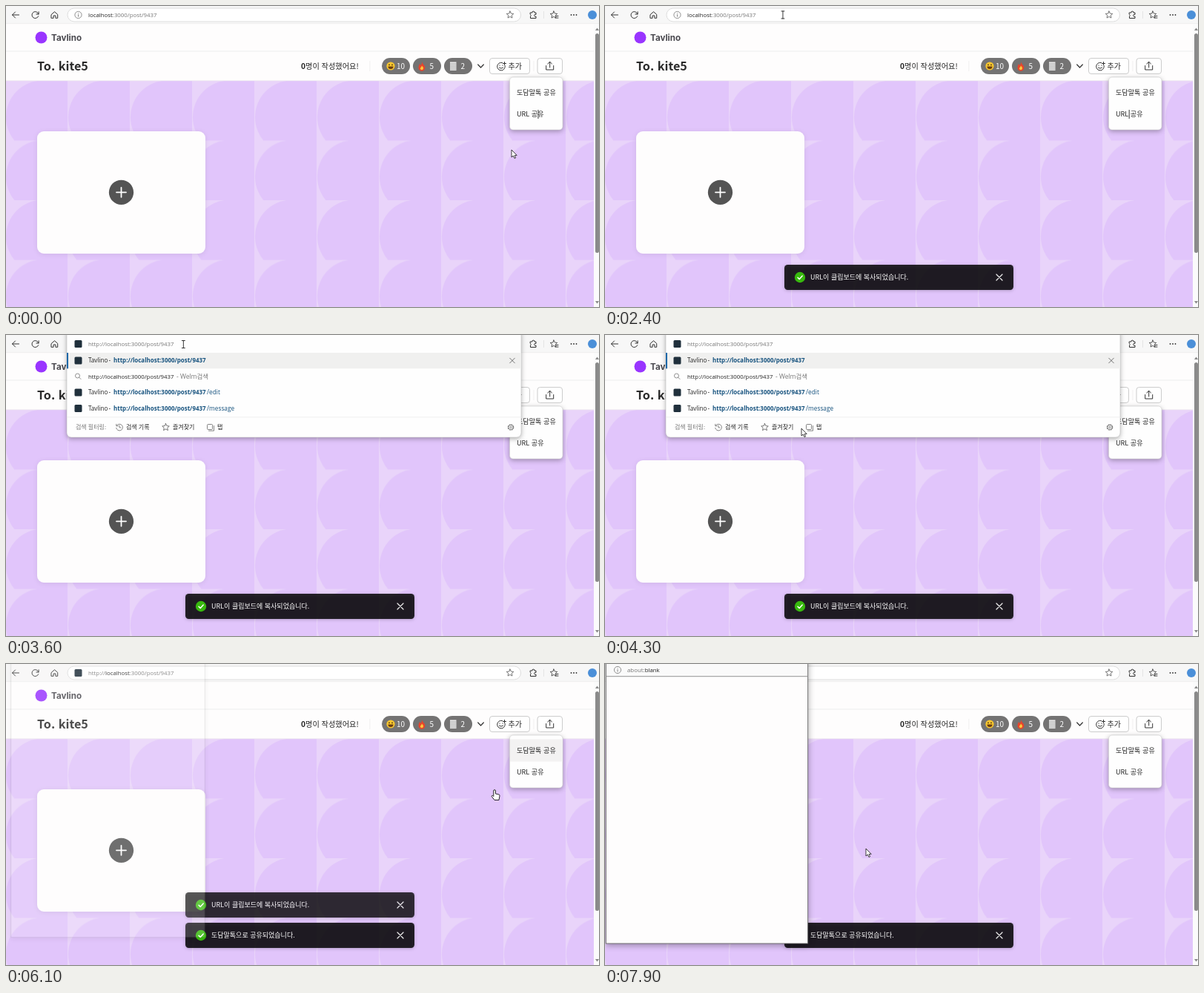
These frames come from a looping animation (800x406 px, 8 s). An HTML page:

```html
<!DOCTYPE html>
<html lang="ko">
<head>
<meta charset="utf-8">
<style>
html, body { margin: 0; width: 100%; height: 100%; overflow: hidden; background: #fefdfd; }
svg { display: block; }
text { white-space: pre; }
.page { font-family: 'Noto Sans CJK KR', 'Noto Sans CJK', sans-serif; }
.chrome { font-family: 'Open Sans', 'Noto Sans CJK KR', sans-serif; }
.brand { font-family: Inter, sans-serif; font-weight: 700; }
.line { fill: none; stroke: #333; stroke-linecap: round; stroke-linejoin: round; }
.float { filter: drop-shadow(0 2px 3px rgba(0,0,0,.3)); }
</style>
</head>
<body>
<svg id="stage" width="800" height="406" viewBox="0 0 800 406"></svg>
<script>
const LOOP = 8000;
const INK = '#222', GREY = '#767676', LINK = '#17537f';
const URL_PATH = ':3000/post/9437';
const FULL_URL = 'http://localhost' + URL_PATH;

// Drawing helpers; text is placed by its vertical centre
const text = (x, cy, str, size, fill = INK, extra = 'class="page"') =>
  `<text x="${x}" y="${cy + size * 0.36}" font-size="${size}" fill="${fill}" ${extra}>${str}</text>`;
const ui = (x, cy, str, size = 8.9, fill = INK, extra = '') =>
  text(x, cy, str, size, fill, `class="chrome" ${extra}`);
const rect = (x, y, w, h, fill, extra = '') =>
  `<rect x="${x}" y="${y}" width="${w}" height="${h}" fill="${fill}" ${extra}/>`;
const circle = (x, y, r, fill, extra = '') =>
  `<circle cx="${x}" cy="${y}" r="${r}" fill="${fill}" ${extra}/>`;
const line = (d, x = 0, y = 0, width = 1, color = '#333') =>
  `<path class="line" d="${d}" transform="translate(${x} ${y})" style="stroke:${color};stroke-width:${width}"/>`;
const group = (id, body, extra = '') => `<g id="${id}" ${extra}>${body}</g>`;
const span = (str, fill) => `<tspan fill="${fill}">${str}</tspan>`;

// Small icons
const starPath = r => {
  const points = Array.from({ length: 10 }, (_, i) => {
    const a = -Math.PI / 2 + i * Math.PI / 5, d = i % 2 ? r * 0.48 : r;
    return (d * Math.cos(a)).toFixed(2) + ' ' + (d * Math.sin(a)).toFixed(2);
  });
  return 'M' + points.join('L') + 'Z';
};
const star = (x, y, r = 5, color = '#555') => line(starPath(r), x, y, 0.8, color);
const info = (x, y) => circle(x, y, 4.6, 'none', `stroke="${GREY}" stroke-width=".8"`) +
  line('M0 -.3V2.2M0 -2.2V-2.1', x, y, 0.9, GREY);
const clock = (x, y) => line('M-3.6 -2.4A4.4 4.4 0 1 1 -4.3 .8M-4.2 -4.2V-1.8H-1.8M0 -2.4V.4H2', x, y, 0.8, '#666');
const favicon = (x, y) => rect(x - 5, y - 5, 10, 10, '#20303c', 'rx="1.5"');
const gear = (x, y) => circle(x, y, 3.6, 'none', 'stroke="#777" stroke-width="1.4" stroke-dasharray="1.9 .93"') +
  circle(x, y, 3.1, '#fff', 'stroke="#777" stroke-width=".8"') + circle(x, y, 1.2, 'none', 'stroke="#777" stroke-width=".8"');
const cross = (x, y, r, color, width) => line(`M${-r} ${-r}L${r} ${r}M${r} ${-r}L${-r} ${r}`, x, y, width, color);

function page() {
  const pill = (x, count, icon, tx) => rect(x, 70, 38, 22, '#747373', 'rx="11"') + icon +
    text(tx, 81, count, 10, '#fff');
  const grin = circle(519, 81, 5.6, '#f7c62f') + circle(517, 79.3, 0.9, '#4a3210') + circle(521, 79.3, 0.9, '#4a3210') +
    '<path d="M515.5 81.5H522.5A3.5 3.5 0 0 1 515.5 81.5Z" fill="#6a3b10"/>';
  const flame = '<path d="M561 75C562 79 565.5 80 565.3 83.3A4.4 4.4 0 0 1 556.5 83.3C556.4 81 557.5 80 558 78C559 79 559.4 79.4 559.6 80C561 78.5 561 77 561 75Z" fill="#e8452c"/>' +
    '<path d="M561 80.5C562 82 563.3 82.6 563 84.6A2.2 2.2 0 0 1 558.8 84.6C558.8 83 560.5 82.5 561 80.5Z" fill="#fcc53c"/>';
  const sheet = rect(599, 75.5, 8.5, 11.5, '#eee') +
    [77.5, 79.5, 81.5, 83.5, 85.5].map(y => rect(599, y, 8.5, 0.6, '#888')).join('');
  const button = (x, w) => rect(x, 70.5, w, 21, '#fff', 'rx="3.5" stroke="#ccc"');
  return rect(0, 24, 793, 77, '#fefdfd') + rect(0, 101, 793, 305, 'url(#tiles)') +
    rect(0, 60.5, 793, 1, '#eeedee') + rect(0, 100.5, 793, 0.7, '#e8e2ec') +
    circle(47.5, 42.5, 8, '#9935ff') + text(61, 43, 'Tavlino', 11.6, '#4a494f', 'class="brand"') +
    text(42, 81.5, 'To. kite5', 16.2, '#2b2b2b', 'class="page" font-weight="700"') +
    text(398, 81, '<tspan font-weight="700">0</tspan>명이 작성했어요!', 10.2) +
    rect(490.5, 74, 0.8, 14, '#eee') + rect(711.5, 74, 0.8, 14, '#eee') +
    pill(507, '10', grin, 527) + pill(549, '5', flame, 571.5) + pill(591, '2', sheet, 613.5) +
    line('M-3.8 -2L0 2L3.8 -2', 640.5, 81, 1.2) +
    button(652.5, 54) + button(717, 33.5) +
    line('M1.5 -5A5.3 5.3 0 1 0 5.2 -1M-2 -1.6V-1.2M2 -1.6V-1.2M-2.6 1.6Q0 4 2.6 1.6M4.5 -6V-2M2.5 -4H6.5', 668, 81.5, 1) +
    text(677.5, 81, '추가', 10) +
    line('M-5 -.5V5H5V-.5M0 2V-5.5M-2.8 -3L0 -5.7L2.8 -3', 733.7, 81, 1) +
    rect(42, 169, 227, 165, '#fefdfd', 'rx="9" style="filter:drop-shadow(0 1px 3px rgba(0,0,0,.08))"') +
    circle(155.5, 251.3, 16.6, '#545454') + line('M-6.5 0H6.5M0 -6.5V6.5', 155.5, 251.3, 1.8, '#fff') +
    rect(679.5, 96, 71.5, 71, '#fefefe', 'rx="4.5" class="float" stroke="#ccc" stroke-width=".6"') +
    rect(680, 101.5, 70.7, 30, '#f3f2f2', 'id="hoverTalk"') + rect(680, 131, 70.7, 30, '#f3f2f2', 'id="hoverUrl"') +
    text(689, 116.3, '도담말톡 공유', 9.1) + text(689, 146, 'URL 공유', 9.1) +
    rect(0, 140, 0.9, 12, '#222', 'id="caret"') +
    rect(793, 24, 7, 382, '#fbfbfb') + rect(795, 37, 5, 296, '#8a8a8a', 'rx="2.5"') +
    '<path d="M795 33L797.5 29.5L800 33ZM795 398L797.5 401.5L800 398Z" fill="#888"/>';
}

function toolbar() {
  return rect(0, 0, 800, 24, '#f7f7f7') + rect(0, 23.5, 800, 0.6, '#e9e9e9') +
    line('M4.5 0H-4.5M-.5 -4L-4.5 0L-.5 4', 13, 12) +
    line('M4.4 -1A4.5 4.5 0 1 0 4.2 1.8M4.6 -4.2V-1H1.4', 39.5, 12) +
    line('M-4.2 -.5L0 -4.3L4.2 -.5V4.3H1.4V1H-1.4V4.3H-4.2Z', 65.5, 12) +
    rect(83, 3, 611.5, 18, '#fff', 'rx="9" stroke="#d6d6d6" stroke-width=".8"') +
    group('plainUrl', info(97.5, 12) + ui(111, 12, 'localhost' + span(URL_PATH, GREY), 7.84)) +
    group('pastedUrl', favicon(97.5, 12) +
      ui(111, 12, span('http://', GREY) + 'localhost' + span(URL_PATH, GREY), 7.84)) +
    star(680, 12) +
    line('M-4 -3H-1.5A1.5 1.5 0 1 1 1.4 -3H3.5V-.5A1.5 1.5 0 1 0 3.5 2V4.5H-4V2A1.6 1.6 0 0 0 -4 -.6Z', 711.5, 12) +
    rect(725, 7, 0.7, 10, '#ddd') + star(739, 12, 5, '#333') + line('M2.5 1.5H5.5M1.5 4H5.5', 739.5, 12) +
    [762.5, 766, 769.5].map(x => circle(x, 12, 0.9, '#333')).join('') + circle(791, 12, 6, '#4b8fd8');
}

function panelFooter(y) {
  return rect(82, y - 14, 613, 0.7, '#e9e9e9') + ui(94, y, '검색 필터링:', 8, GREY) +
    clock(153, y) + ui(162, y, '검색 기록', 8) + star(215.5, y) + ui(225, y, '즐겨찾기', 8) +
    rect(271.5, y - 4, 7, 7, 'none', 'rx="1" stroke="#666" stroke-width=".8"') +
    line('M-2.5 4.7H4.5V-2', 276, y, 0.8, '#666') + ui(285, y, '탭', 8) + gear(681, y);
}
const panelBase = h => rect(82, -8, 613, h + 8, '#fefefe', 'rx="6" class="float" stroke="#bbb" stroke-width=".5"');

function recentPanel() {
  const rows = ['솔내사이버캠퍼스' + span(' - Welm검색', GREY), '노트북 녹화 화면 크기', '노트북 녹화 화면 조절ㅇ',
    'pondel', 'gorlab readme 템프릿', '노을', 'gorl', '솔빛담'];
  return panelBase(239) + favicon(97.5, 12) + rect(111, 6, 93.5, 12.5, '#2f7ec7') +
    ui(111, 12, 'localhost' + URL_PATH, 7.84, '#fff') +
    rect(88, 25.5, 34, 12.5, '#f8f4fb') + ui(91, 31.5, '최근 검색', 7.2, '#6b2fa0') +
    rect(82, 61.5, 613, 21.3, '#e4e4e3') + cross(683, 72, 3.3, '#555', 0.8) +
    rows.map((row, i) => clock(97.5, 51 + i * 21.2) + ui(111, 51 + i * 21.2, row)).join('') + panelFooter(226);
}

function matchPanel() {
  const match = (y, tail = '') => favicon(97.5, y) + ui(111, y, 'Tavlino', 8.1) + ui(138.5, y, '-', 8.1) +
    ui(145, y, FULL_URL, 7.95, LINK, 'font-weight="700"') + ui(271, y, tail, 8.3, LINK);
  return panelBase(138) + favicon(97.5, 12) + ui(111, 12, FULL_URL, 7.84, GREY) +
    rect(82, 24, 613, 21.3, '#f0f0ef') + rect(82, 24, 2, 21.3, '#1d68a8') + cross(683, 34.5, 3.3, '#555', 0.8) +
    match(34.5) + circle(96.5, 55, 3, 'none', 'stroke="#777" stroke-width=".8"') + line('M2 2L4.5 4.5', 96.5, 55, 0.8, '#777') +
    ui(111, 56, FULL_URL, 7.84) + ui(230, 56, '- Welm검색', 8.5, GREY) +
    match(77.5, '/edit') + match(99, '/message') + panelFooter(124.5);
}

const toast = (id, message) => group(id,
  rect(242, 0, 309, 34, '#000', 'rx="4.5" fill-opacity=".83" style="filter:drop-shadow(0 1px 2px rgba(0,0,0,.25))"') +
  circle(263, 17, 7.2, '#38b90e') + line('M-3 .2L-.8 2.4L3.2 -2', 263, 17, 1.5, '#fff') +
  text(277, 17, message, 9, '#fff', 'class="page" font-weight="500"') + cross(532, 17, 4, '#eee', 1.2));

const popupWindow = () =>
  rect(1.3, -10, 272.4, 387, '#fefdfd', 'stroke="#666" stroke-width=".9" style="filter:drop-shadow(0 2px 4px rgba(0,0,0,.35))"') +
  group('windowTitle', rect(2, 0, 271, 16.5, '#fafafa') + rect(2, 16.3, 271, 0.9, '#858585') + info(17, 8) +
    ui(30, 8, span('about:', GREY) + 'blank', 7.86));

const cursors =
  group('arrow', '<path d="M0 0V10L2.3 8L4 11.5L5.6 10.8L4.1 7.4H7.2Z" fill="#fff" stroke="#111" stroke-width=".8"/>') +
  group('hand', '<path d="M-1.2 7.5V1A1.3 1.3 0 0 1 1.4 1V5L6 6Q7.2 6.4 7 7.8L6 13.5H0L-3.8 8.6Q-3.6 7 -2.4 7.4L-1.2 8.6Z" fill="#fff" stroke="#111" stroke-width=".9" stroke-linejoin="round"/>') +
  group('beam', line('M-2 -5H2M-2 5H2M0 -5V5', 0, 0, 0.9, '#222'));

const stage = document.getElementById('stage');
stage.innerHTML = `<defs><pattern id="tiles" x="-1" y="101" width="84" height="80.5" patternUnits="userSpaceOnUse">
  <rect width="84" height="80.5" fill="#e9d4fa"/><circle cx="50.5" cy="49" r="49.5" fill="#e1c5fb"/>
  <rect x="50.5" width="34" height="80.5" fill="#e1c5fb"/></pattern></defs>` +
  page() + toolbar() + toast('urlToast', 'URL이 클립보드에 복사되었습니다.') +
  toast('talkToast', '도담말톡으로 공유되었습니다.') +
  group('recent', recentPanel()) + group('match', matchPanel()) + group('popup', popupWindow()) + cursors;

const el = id => document.getElementById(id);
const parts = {};
stage.querySelectorAll('[id]').forEach(node => parts[node.id] = node);

const clamp = v => Math.max(0, Math.min(1, v));
const progress = (t, start, length) => clamp((t - start) / length);
const easeOut = p => 1 - (1 - p) * (1 - p);
const smooth = p => p * p * (3 - 2 * p);
const show = (id, on) => parts[id].setAttribute('display', on ? 'inline' : 'none');
const place = (id, x, y) => parts[id].setAttribute('transform', `translate(${x} ${y})`);

// Pointer stops: time, x, y
const pointer = [
  [0, 682, 194], [250, 683, 192], [850, 706, 145], [1280, 706, 145], [1500, 506, 122], [2350, 240, 12],
  [2800, 239, 11], [3550, 239, 11], [4300, 265, 126], [4600, 300, 150], [5350, 712, 110], [5750, 713, 110],
  [6100, 659, 170], [6700, 440, 235], [7300, 356, 248], [7900, 352, 249], [LOOP, 352, 249]
];

function pointerAt(t) {
  const i = pointer.findIndex(stop => stop[0] > t);
  const [t0, x0, y0] = pointer[i - 1], [t1, x1, y1] = pointer[i];
  const p = smooth((t - t0) / (t1 - t0));
  return [x0 + (x1 - x0) * p, y0 + (y1 - y0) * p];
}

function poseToast(id, t, start, lift, fade) {
  const p = progress(t, start, 350);
  show(id, p > 0 && fade < 1);
  place(id, 0, 349 - 20 * (1 - easeOut(p)) - lift);
  parts[id].setAttribute('opacity', clamp(p * 1.25) * (1 - fade));
}

function render(t) {
  const [x, y] = pointerAt(t);
  const overItems = x > 680 && x < 751 && y > 101 && y < 161;
  const hand = overItems || (t > 5600 && t < 6200);
  const beam = !hand && t < 4000 && y < 22 && x < 690;
  show('hand', hand);
  show('beam', beam);
  show('arrow', !hand && !beam);
  ['hand', 'beam', 'arrow'].forEach(id => place(id, x, y));
  show('hoverTalk', (overItems && y < 131) || (t > 5300 && t < 6300));
  show('hoverUrl', overItems && y >= 131);

  const clicked = t >= 1280;
  parts.caret.setAttribute('x', clicked ? 706.7 : 717.5);
  show('caret', t < 2800 && (t - (clicked ? 1280 : 0)) % 1060 < 530);

  show('recent', t >= 2800 && t < 3550);
  show('match', t >= 3550 && t < 5600);
  show('plainUrl', t < 2800);
  show('pastedUrl', t >= 2800);

  poseToast('urlToast', t, 1300, 41 * easeOut(progress(t, 5800, 250)), progress(t, 6080, 270));
  poseToast('talkToast', t, 5750, 0, 0);

  const p = progress(t, 6060, 220), scale = 0.94 + 0.06 * easeOut(p);
  show('popup', p > 0);
  parts.popup.setAttribute('opacity', clamp(p * 0.85 + (p > 0.5 ? p - 0.5 : 0)));
  parts.popup.setAttribute('transform', `translate(137 169) scale(${scale}) translate(-137 -169)`);
  show('windowTitle', t >= 6500);
}

function frame(now) {
  render(now % LOOP);
  requestAnimationFrame(frame);
}
render(0);
requestAnimationFrame(frame);
</script>
</body>
</html>
```
